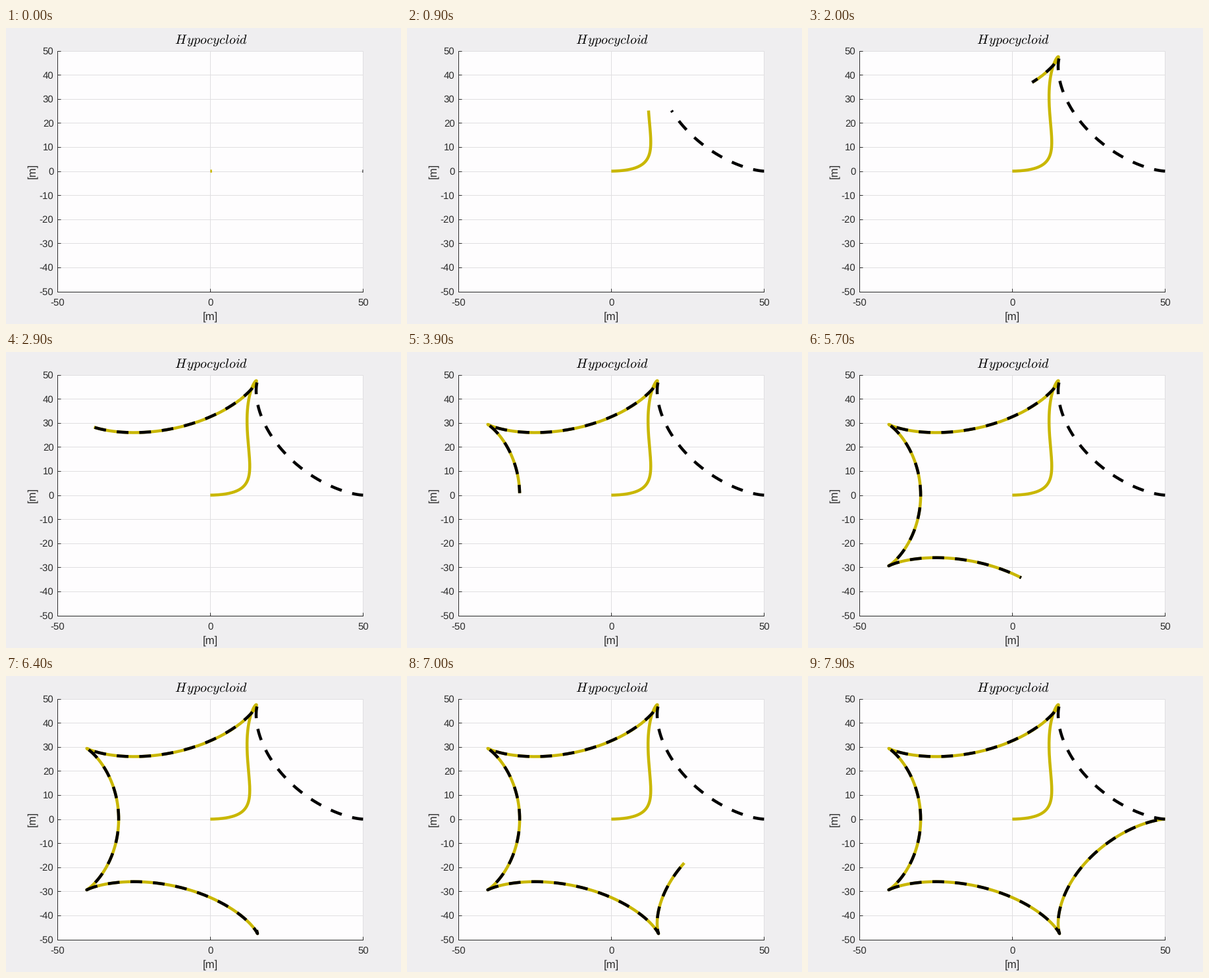
Write a matplotlib script that moves like this. It is 600 px wide and 450 px high and loops after 8000 ms.

```python
import numpy as np
import matplotlib.pyplot as plt
from matplotlib.animation import FuncAnimation

W, H = 600, 450
FRAMES, INTERVAL = 80, 100
LEFT, RIGHT, TOP, BOTTOM = 78.3, 542.4, 34.6, 400.6
INK = "#2b2b2b"
TICK_SIZE, LABEL_SIZE, TITLE_SIZE = 15, 16.8, 20
LINE_WIDTH, DASH, GAP = 4.5, 17.8, 16.5

plt.rcParams["font.family"] = "Liberation Sans"
plt.rcParams["mathtext.fontset"] = "cm"
plt.rcParams["text.hinting"] = "none"


def reference(t):
    """Hypocycloid with radii 50 and 10."""
    return 40 * np.cos(t) + 10 * np.cos(4 * t), 40 * np.sin(t) - 10 * np.sin(4 * t)


def tracker(t, decay=3.55, omega=1.85):
    """Follower that starts at the origin; its x error is a damped oscillation."""
    x, y = reference(t)
    swing = np.cos(omega * t) + decay / omega * np.sin(omega * t)
    return x - 50 * np.exp(-decay * t) * swing, y


def angle(frame):
    """Angle reached, in degrees; the pace varies a little."""
    return np.interp(frame, [0, 9, 20, 39, 57, 70, 78],
                     [2.6, 42.4, 94.4, 179.4, 262, 323.5, 360])


# At 72 dpi one point is one pixel.
fig = plt.figure(figsize=(W / 72, H / 72), dpi=72, facecolor="#efeef0")
ax = fig.add_axes([LEFT / W, 1 - BOTTOM / H, (RIGHT - LEFT) / W, (BOTTOM - TOP) / H],
                  facecolor="#fefdfe")
ax.set(xlim=(-50, 50), ylim=(-50, 50), xticks=(-50, 0, 50), yticks=range(-50, 51, 10))
ax.set_axisbelow(True)
ax.grid(color="#e0dfe1", lw=1)
plt.setp(ax.get_xgridlines() + ax.get_ygridlines(), clip_on=False)
ax.tick_params(direction="in", length=5, width=1, color=INK,
               labelbottom=False, labelleft=False)
for side in ("top", "right"):
    ax.spines[side].set_visible(False)
for side in ("left", "bottom"):
    ax.spines[side].set(color=INK, linewidth=1)


def label(x, y, text, size=TICK_SIZE, **style):
    style = {"ha": "center", "va": "baseline", "color": INK, **style}
    fig.text(x / W, 1 - y / H, text, fontsize=size, **style)


for value in range(-50, 51, 10):
    y = BOTTOM - (value + 50) / 100 * (BOTTOM - TOP)
    label(72.5, y + 5.3, str(value), ha="right")
for value in (-50, 0, 50):
    label(LEFT + (value + 50) / 100 * (RIGHT - LEFT), 421.6, str(value))
label(310.7, 443.2, "[m]", LABEL_SIZE)
label(39.7, 217.5, "[m]", LABEL_SIZE, va="center", rotation=90)
label(311.5, 23.6, r"$H\hspace{0.1}y\hspace{0.04}pocy\hspace{0.04}cloid$",
      TITLE_SIZE, color="black")

follow_line, = ax.plot([], [], color="#c9b700", lw=LINE_WIDTH, clip_on=False,
                       solid_capstyle="butt", zorder=3)
ref_line, = ax.plot([], [], color="black", lw=LINE_WIDTH, clip_on=False,
                    dash_capstyle="butt", zorder=4,
                    linestyle=(1 / LINE_WIDTH, (DASH / LINE_WIDTH, GAP / LINE_WIDTH)))


def draw(frame):
    end = angle(frame)
    t = np.radians(np.linspace(0, end, int(end * 2) + 4))
    follow_line.set_data(*tracker(t))
    ref_line.set_data(*reference(t))
    return follow_line, ref_line


anim = FuncAnimation(fig, draw, frames=FRAMES, interval=INTERVAL,
                     repeat=True, repeat_delay=0)
plt.show()
```
